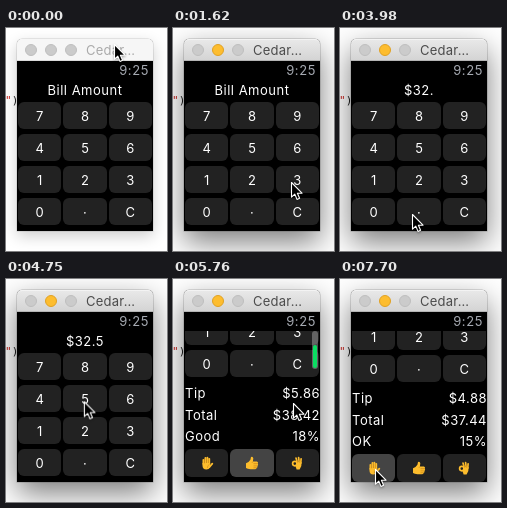
An HTML page for the animation above (8000 ms loop, 161 by 223 pixels).

```html
<!DOCTYPE html>
<html lang="en">
<head>
<meta charset="utf-8">
<title>Tip calculator</title>
<style>
html, body { margin: 0; width: 100%; height: 100%; overflow: hidden; background: #fff; }
.stage { position: relative; width: 161px; height: 223px; overflow: hidden; font: 13px/20px Inter, sans-serif; letter-spacing: .5px; color: #fff; }
.stage * { box-sizing: border-box; }
.stage, .stage *, .stage *::before { animation: 8s linear infinite; }

.code { position: absolute; left: -1px; top: 64px; font: 11px/18px "DejaVu Sans Mono", monospace; letter-spacing: 0; color: #222; }
.code i { font-style: normal; color: #c41a16; }

.window { position: absolute; left: 11px; top: 11px; width: 136px; height: 192px; border-radius: 5px 5px 0 0; background: #000; animation-name: shadow; animation-timing-function: step-end; }
.bar { height: 22px; border-radius: 5px 5px 0 0; background: linear-gradient(#e9e9e9, #d3d3d3); box-shadow: inset 0 1px #f3f3f3, inset 0 -1px #b4b4b4; color: #4b4b4b; }
.bar::before { content: ""; position: absolute; inset: 0 0 auto; height: 22px; border-radius: 5px 5px 0 0; background: #f6f6f6; box-shadow: inset 0 -1px #dadada; }
.bar::before { animation-name: inactive; animation-timing-function: step-end; }
.dot { position: absolute; top: 5px; width: 12px; height: 12px; border-radius: 50%; background: #cbcbcb; border: 1px solid #bdbdbd; }
.dot:nth-child(1) { left: 8px; }
.dot:nth-child(2) { left: 28px; animation-name: amber; animation-timing-function: step-end; }
.dot:nth-child(3) { left: 48px; }
.title { position: absolute; left: 69px; top: 1px; font: 13px/21px Inter, sans-serif; letter-spacing: .25px; animation-name: title; animation-timing-function: step-end; }
.time { position: absolute; right: 4px; top: 21px; color: #a6aab2; letter-spacing: .6px; }

.view { position: absolute; left: 0; top: 41px; width: 136px; height: 151px; overflow: hidden; }
.page { position: absolute; inset: 0 0 auto; height: 246px; animation-name: scroll; }
.reel { height: 20px; overflow: hidden; }
.reel div { animation-timing-function: step-end; }
.reel span { display: block; height: 20px; white-space: nowrap; }
.bill { text-align: center; }
.bill div { animation-name: bill; }
.keys { position: absolute; left: 1px; right: 1px; display: grid; grid-template-columns: repeat(3, 1fr); grid-auto-rows: 27px; gap: 5px 2px; text-align: center; line-height: 29px; }
.keys b { font-weight: 400; border-radius: 6px; background: #222; letter-spacing: 0; }
.pad { top: 22px; }
.rates { top: 217px; grid-auto-rows: 28px; }
.rates svg { display: block; margin: 6px auto 0; width: 16px; height: 16px; }
.rates b:nth-child(1) { animation: low 8s step-end infinite; }
.rates b:nth-child(2) { animation: high 8s step-end infinite; }
.row { position: absolute; left: 1px; right: 0; display: flex; justify-content: space-between; }
.row .reel:last-child { text-align: right; }
.row .reel div { animation-name: result; }

.track { position: absolute; left: 128px; top: 41px; width: 6px; height: 38px; padding: 1px; border-radius: 3px; background: rgba(255,255,255,.3); animation-name: track; }
.thumb { height: 23px; border-radius: 2px; background: #0bdc62; animation-name: thumb; }
.cursor { position: absolute; left: -1px; top: -1px; width: 14px; height: 21px; overflow: visible; animation-name: cursor; filter: drop-shadow(0 1px 1px rgba(0,0,0,.35)); }

@keyframes shadow {
  0% { box-shadow: 0 0 0 .5px rgba(0,0,0,.16), 0 5px 15px rgba(0,0,0,.2); }
  4.125%, 100% { box-shadow: 0 0 0 .5px rgba(0,0,0,.25), 0 11px 30px rgba(0,0,0,.52); }
}
@keyframes inactive { 0% { opacity: 1; } 4.125%, 100% { opacity: 0; } }
@keyframes amber {
  0% { background: #cbcbcb; border-color: #bdbdbd; }
  4.375%, 100% { background: #fdbd2f; border-color: #dfa023; }
}
@keyframes title { 0% { color: #aaa; } 4.125%, 100% { color: #4b4b4b; } }
@keyframes bill {
  0% { transform: none; }
  34.125% { transform: translateY(-20px); }
  43.75% { transform: translateY(-40px); }
  49.75% { transform: translateY(-60px); }
  57.5% { transform: translateY(-80px); }
  64.75%, 100% { transform: translateY(-100px); }
}
@keyframes result { 0% { transform: none; } 96.25%, 100% { transform: translateY(-20px); } }
@keyframes low { 0% { background: #222; } 96.25%, 100% { background: #444; } }
@keyframes high { 0% { background: #444; } 96.25%, 100% { background: #222; } }
@keyframes scroll {
  0%, 69.5% { transform: none; }
  69.75% { transform: translateY(-8px); }
  71.25% { transform: translateY(-78px); animation-timing-function: ease-out; }
  72% { transform: translateY(-99px); animation-timing-function: ease-in-out; }
  74.25%, 100% { transform: translateY(-94px); }
}
@keyframes thumb {
  0%, 69.75% { transform: none; }
  71.25% { transform: translateY(10px); }
  72%, 100% { transform: translateY(13px); }
}
@keyframes track {
  0%, 69.74% { opacity: 0; }
  69.75%, 78% { opacity: 1; }
  80.125%, 100% { opacity: 0; }
}
@keyframes cursor {
  0%, 12.75% { transform: translate(108px, 16px); animation-timing-function: ease-in-out; }
  15.5%, 17.25% { transform: translate(99px, 148px); animation-timing-function: ease-in-out; }
  20.25%, 36% { transform: translate(118px, 154px); animation-timing-function: ease-in-out; }
  38.625%, 45.25% { transform: translate(67px, 154px); animation-timing-function: ease-in; }
  47% { transform: translate(60px, 172px); animation-timing-function: ease-out; }
  49%, 51.5% { transform: translate(72px, 186px); animation-timing-function: ease-in-out; }
  55.25%, 58.5% { transform: translate(72px, 122px); animation-timing-function: ease-in-out; }
  61.625%, 61.75% { transform: translate(107px, 124px); animation-timing-function: ease-out; }
  62.625%, 82.25% { transform: translate(120px, 124px); animation-timing-function: ease-in-out; }
  85.25%, 87.25% { transform: translate(62px, 174px); animation-timing-function: ease-in-out; }
  91.125%, 100% { transform: translate(35px, 190px); }
}
</style>
</head>
<body>
<div class="stage">
  <div class="code"><i>"</i>)</div>
  <div class="window">
    <div class="bar">
      <span class="dot"></span><span class="dot"></span><span class="dot"></span>
      <span class="title">Cedar…</span>
    </div>
    <div class="time">9:25</div>
    <div class="view">
      <div class="page">
        <div class="reel bill"><div>
          <span>Bill Amount</span><span>$3</span><span>$32</span><span>$32.</span><span>$32.5</span><span>$32.56</span>
        </div></div>
        <div class="keys pad">
          <b>7</b><b>8</b><b>9</b>
          <b>4</b><b>5</b><b>6</b>
          <b>1</b><b>2</b><b>3</b>
          <b>0</b><b>·</b><b>C</b>
        </div>
        <div class="row" style="top:151px"><span>Tip</span><div class="reel"><div><span>$5.86</span><span>$4.88</span></div></div></div>
        <div class="row" style="top:173px"><span>Total</span><div class="reel"><div><span>$38.42</span><span>$37.44</span></div></div></div>
        <div class="row" style="top:194px"><div class="reel"><div><span>Good</span><span>OK</span></div></div><div class="reel"><div><span>18%</span><span>15%</span></div></div></div>
        <div class="keys rates">
          <b><svg viewBox="0 0 16 16" fill="none" stroke="#fdbd2d" stroke-width="1.8" stroke-linecap="round">
            <path d="M4.4 9V4.8M6.4 8V3M8.4 8V2.6M10.3 8.5V3.8M10.5 12 13.3 8.6"/>
            <path fill="#fdbd2d" stroke="none" d="M3.5 8H11.2V12.2Q10 14.6 7.4 14.6 3.5 14.4 3.5 10.5Z"/>
            <path stroke="#c98313" stroke-width=".6" d="M5.4 8V5M7.4 7.6V3.8M9.35 7.6V4.6M10.4 9.2Q8.4 10.4 8.4 12.6"/>
          </svg></b>
          <b><svg viewBox="0 0 16 16">
            <path fill="#fdbd2d" d="M2 8.2Q5 7.4 6.4 4.8L7 2Q8.9 1 9.3 3.3L8.9 6.5H13Q14.8 7.2 13.7 8.7 14.8 9.8 13.4 10.9 14 12.2 12.6 12.8 12.5 14.3 10.8 14.3H6.5Q3.5 14 2 13Z"/>
            <path fill="none" stroke="#c98313" stroke-width=".7" d="M9.5 8.7H13.4M9.5 10.9H13.2M9.5 12.8H12.4M8.9 6.6 8 7.8"/>
          </svg></b>
          <b><svg viewBox="0 0 16 16" fill="none" stroke="#fdbd2d" stroke-width="1.7" stroke-linecap="round" stroke-linejoin="round">
            <path d="M8.6 8 7 3M10.3 8 9.6 2.6M11.7 8.5 12.1 3.8"/>
            <path fill="#fdbd2d" stroke="none" d="M7.6 7H12.6Q13 11.5 10.6 14.6H7.6L6.6 11.4Z"/>
            <circle cx="5.8" cy="8.6" r="2.2"/>
            <path stroke="#c98313" stroke-width=".6" d="M8.7 7.4 8.1 5M10.8 7.4 10.8 5"/>
          </svg></b>
        </div>
      </div>
    </div>
    <div class="track"><div class="thumb"></div></div>
  </div>
  <svg class="cursor" viewBox="-1 -1 14 21">
    <path d="M.5.5V15.2L3.8 12.1 6 17.4 8.6 16.3 6.4 11.2H11Z" stroke="#fff" stroke-width="1.1" stroke-linejoin="round"/>
  </svg>
</div>
</body>
</html>
```
